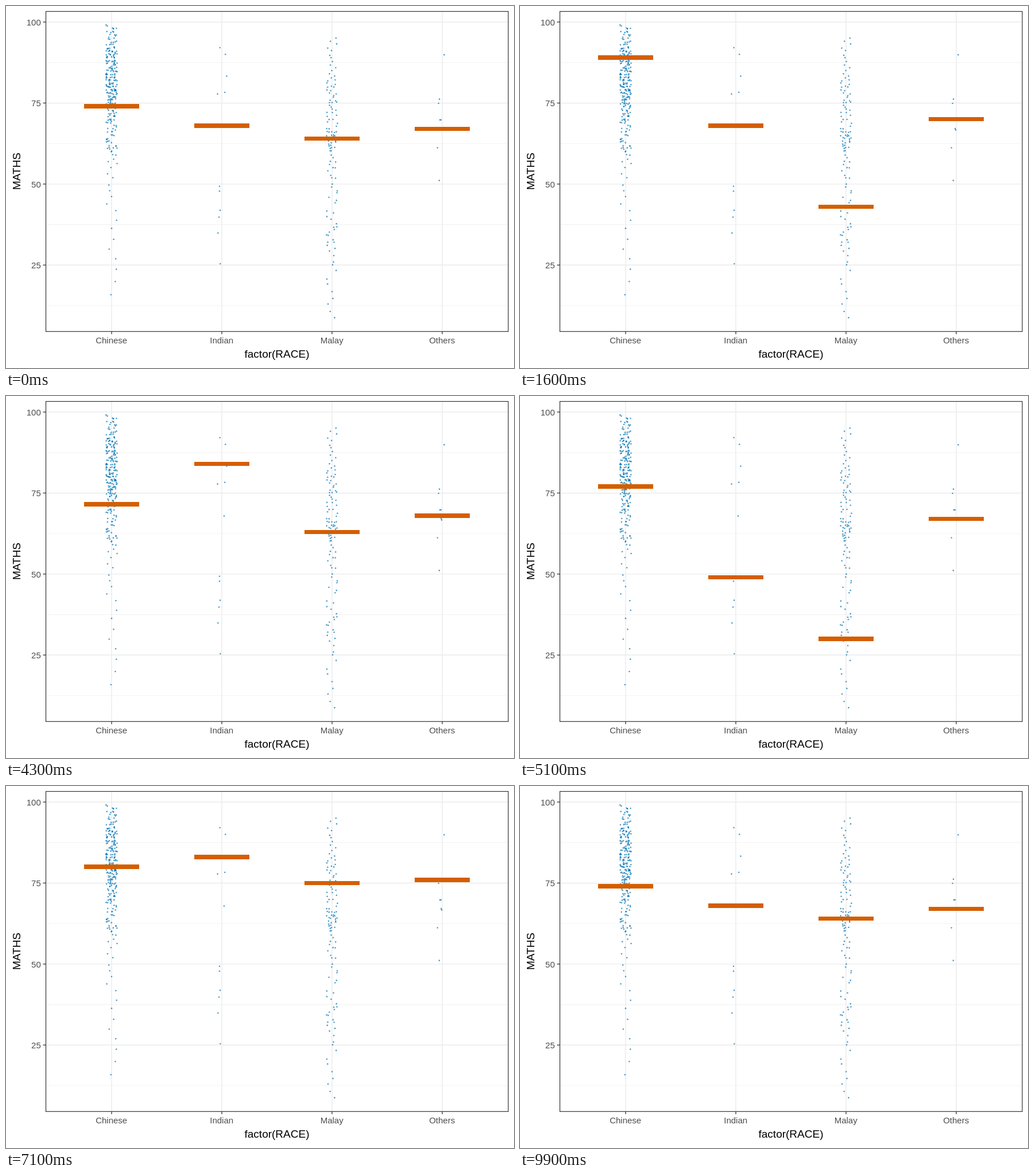
Animation, 885 px wide and 632 px high, one loop 10000 ms. Source, as an HTML page:

```html
<!DOCTYPE html>
<html lang="en">
<head>
<meta charset="utf-8">
<title>Maths scores by group</title>
<style>
  html, body { margin: 0; width: 100%; height: 100%; overflow: hidden; background: #fff; }
  svg { display: block; width: 100%; height: 100%; }
  text { font-family: "Liberation Sans", Arial, sans-serif; font-size: 15px; fill: #4d4d4d; }
  .title { font-size: 19px; fill: #000; }
  .major { stroke: #ebebeb; stroke-width: 1.4; }
  .minor { stroke: #ebebeb; stroke-width: 0.7; }
  .tick { stroke: #333; stroke-width: 1.3; }
  .frame { fill: none; stroke: #333; stroke-width: 1.2; }
  .dots { fill: #0072b2; fill-opacity: 0.7; }
  .bars { fill: #d55e00; }
</style>
</head>
<body>
<svg id="plot" viewBox="0 0 885 632"></svg>
<script>
const plot = document.getElementById("plot");
const groups = ["Chinese", "Indian", "Malay", "Others"];
const box = { left: 69.5, top: 9.5, right: 875, bottom: 568.3 };
const groupX = i => 184 + 192 * i;
const scoreY = v => 28 + (100 - v) * 5.657;

function add(parent, tag, attrs, text) {
  const el = document.createElementNS("http://www.w3.org/2000/svg", tag);
  for (const key in attrs) el.setAttribute(key, attrs[key]);
  if (text) el.textContent = text;
  parent.appendChild(el);
  return el;
}
const line = (cls, x1, y1, x2, y2) => add(plot, "line", { class: cls, x1, y1, x2, y2 });

// Grid, ticks and labels
for (let v = 12.5; v < 100; v += 25) line("minor", box.left, scoreY(v), box.right, scoreY(v));
for (let v = 25; v <= 100; v += 25) {
  const y = scoreY(v);
  line("major", box.left, y, box.right, y);
  line("tick", 64.5, y, box.left, y);
  add(plot, "text", { x: 60.8, y: y + 6, "text-anchor": "end" }, String(v));
}
groups.forEach((name, i) => {
  const x = groupX(i);
  line("major", x, box.top, x, box.bottom);
  line("tick", x, box.bottom, x, 573);
  add(plot, "text", { x: x - 0.3, y: 589, "text-anchor": "middle" }, name);
});
add(plot, "text", { class: "title", x: 472, y: 614, "text-anchor": "middle" }, "factor(RACE)");
add(plot, "text", { class: "title", transform: "translate(24.5 288.5) rotate(-90)", "text-anchor": "middle" }, "MATHS");

// Jittered scores
const dots = add(plot, "g", { class: "dots" });
let seed = 20;
function random() {
  seed = (seed * 16807) % 2147483647;
  return seed / 2147483647;
}
const jitter = size => (random() * 2 - 1) * size;

function dot(group, score, spread) {
  add(dots, "circle", { cx: groupX(group) + jitter(9.6), cy: scoreY(score + jitter(spread)), r: 1.3 });
}

// Spreads count dots along the deciles; tail bends the lowest one
function scatter(group, count, deciles, tail) {
  const steps = deciles.length - 1;
  for (let n = 0; n < count; n++) {
    const pos = n / (count - 1) * steps;
    const k = Math.min(Math.floor(pos), steps - 1);
    const u = k === steps - 1 ? (pos - k) ** tail : pos - k;
    dot(group, Math.round(deciles[k] + (deciles[k + 1] - deciles[k]) * u), 0.35);
  }
}
scatter(0, 262, [99, 92.3, 89.2, 86, 83, 80, 77.5, 74.2, 69.2, 61, 16], 2.3);
scatter(2, 119, [95, 83.2, 78, 72.5, 66.3, 64, 60.5, 52, 38.5, 30, 9], 1.2);
for (const v of [92.1, 90, 83.3, 78.3, 77.8, 67.9, 49.3, 47.8, 41.9, 39.8, 34.9, 25.4]) dot(1, v, 0);
for (const v of [89.9, 76.2, 74.9, 69.8, 69.8, 67.1, 66.7, 61.2, 51.1]) dot(3, v, 0);

// One sampled score per group in each draw
const draws = [
  [74, 68, 64, 67], [74, 78, 70, 75], [70, 42, 60, 70], [78, 25, 62, 90], [89, 68, 43, 70],
  [71, 49, 22, 67], [71, 40, 58, 61], [63, 25, 62, 67], [77, 92, 9, 67], [89, 92, 21, 70],
  [76, 90, 49, 61], [67, 78, 77, 75], [72, 68, 62, 70], [77, 49, 30, 67], [80, 90, 60, 75],
  [89, 83, 31, 76], [80, 92, 16, 67], [81, 83, 64, 51], [80, 83, 75, 76], [75, 90, 44, 70],
  [93, 68, 66, 75], [78, 35, 58, 70], [85, 90, 66, 67], [91, 78, 70, 51], [80, 68, 68, 75]
];
const barLayer = add(plot, "g", { class: "bars" });
const bars = groups.map((name, i) => add(barLayer, "rect", { x: groupX(i) - 48, width: 96 }));
add(plot, "rect", {
  class: "frame", x: box.left, y: box.top,
  width: box.right - box.left, height: box.bottom - box.top
});

// Each draw holds for three ticks, then one tick halfway to the next; draw 12 is a tick shorter
function render(ms) {
  let tick = Math.floor((ms % 10000) / 100);
  if (tick >= 48) tick++;
  const index = Math.floor(tick / 4);
  const from = draws[index % draws.length];
  const to = draws[(index + 1) % draws.length];
  const mix = tick % 4 === 3 ? 0.5 : 0;
  bars.forEach((bar, i) => {
    const y = scoreY(from[i] + (to[i] - from[i]) * mix);
    const top = Math.round(y - 3.75);
    bar.setAttribute("y", top);
    bar.setAttribute("height", Math.round(y + 3.75) - top);
  });
}

const start = performance.now();
function loop() {
  render(performance.now() - start);
  requestAnimationFrame(loop);
}
loop();
</script>
</body>
</html>
```
